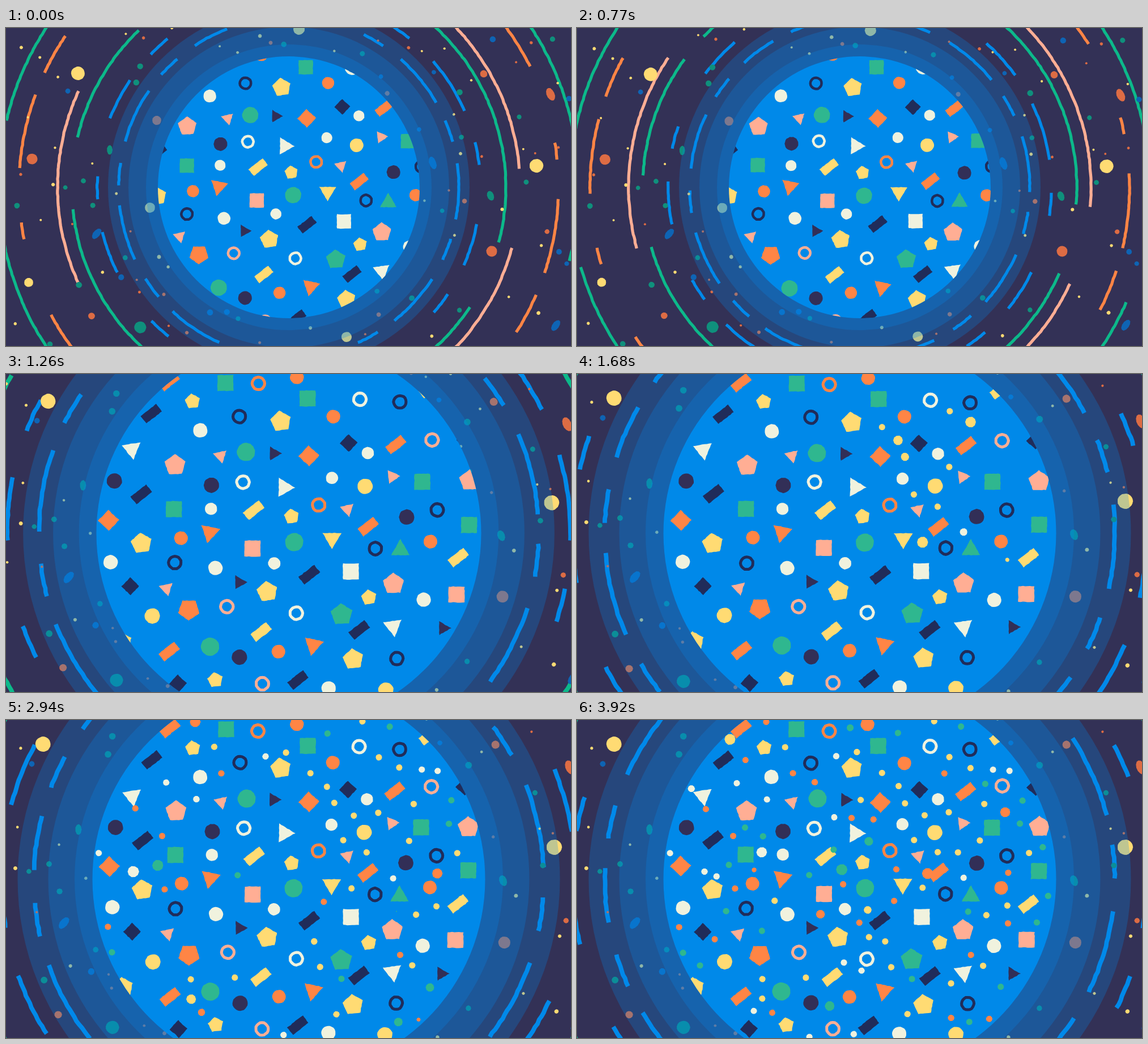
Animation of 997 by 561 pixels, one loop 3.99 s. Source, as an HTML page:

```html
<!DOCTYPE html>
<html lang="en">
<head>
<meta charset="utf-8">
<title>Shapes in a portal</title>
<style>
html, body { margin: 0; width: 100%; height: 100%; overflow: hidden; background: #333156; }
svg { display: block; width: 100%; height: 100%; }
</style>
</head>
<body>
<svg viewBox="0 0 997 561" preserveAspectRatio="none">
  <defs><clipPath id="hole"><circle id="holeEdge" cx="499" cy="281"/></clipPath></defs>
  <rect width="997" height="561" fill="#333156"/>
  <g id="arcs" fill="none" stroke-width="5.2"></g>
  <g id="dust"></g>
  <g id="rings" fill="#0089e9"></g>
  <g clip-path="url(#hole)"><g id="core"></g></g>
</svg>
<script>
const LOOP = 3990, STEP = 70, CUT = 1400, SKIP = 1550;
const CX = 499, CY = 281, ZOOM = 1.115;
const C = {
  blue: '#0089e9', green: '#2fb78f', mint: '#0cb98a', peach: '#ffae94', orange: '#ff8545',
  yellow: '#ffdb73', white: '#f0f2de', navy: '#322f57', ink: '#202c5a',
  rust: '#dd6c44', teal: '#0f907c', deep: '#0e64b4'
};

const $ = id => document.getElementById(id);
const rad = d => d * Math.PI / 180;
const clamp = v => Math.max(0, Math.min(1, v));
const lerp = (a, b, u) => a + (b - a) * u;
const polar = (r, deg) => [r * Math.cos(rad(deg)), r * Math.sin(rad(deg))];
const hash = (a, b) => { const v = Math.sin(a * 127.1 + b * 311.7) * 43758.5453; return v - Math.floor(v); };
const inOut = u => { u = clamp(u); return u < .5 ? 4 * u ** 3 : 1 - 4 * (1 - u) ** 3; };

let seed = 7;
const rnd = () => { seed = (seed * 16807) % 2147483647; return seed / 2147483647; };
const noise = a => (rnd() * 2 - 1) * a;

function add(parent, tag, attrs) {
  const el = document.createElementNS('http://www.w3.org/2000/svg', tag);
  for (const k in attrs) el.setAttribute(k, attrs[k]);
  $(parent).appendChild(el);
  return el;
}
const toPath = pts => 'M' + pts.map(p => p[0].toFixed(1) + ' ' + p[1].toFixed(1)).join('L');
const turn = (pts, deg) => {
  const [c, s] = polar(1, deg);
  return pts.map(([x, y]) => [x * c - y * s, x * s + y * c]);
};

// Hand-cut outlines, centred on 0,0
function cut(corners) {
  const out = [];
  corners.forEach(([x, y], i) => {
    const [u, v] = corners[(i + 1) % corners.length];
    const n = Math.max(1, Math.round(Math.hypot(u - x, v - y) / 4));
    for (let k = 0; k < n; k++) out.push([lerp(x, u, k / n) + noise(.5), lerp(y, v, k / n) + noise(.5)]);
  });
  return toPath(out) + 'Z';
}
const poly = (n, r, rot) => cut(Array.from({ length: n }, (_, i) => polar(r, rot + i * 360 / n)));
const box = (w, h, rot) => cut(turn([[-w, -h], [w, -h], [w, h], [-w, h]].map(p => [p[0] / 2, p[1] / 2]), rot));
function blob(rx, ry = rx, rot = 0) {
  const n = Math.max(8, Math.round(rx * 1.8));
  const pts = Array.from({ length: n }, (_, i) => {
    const [x, y] = polar(1 + noise(.03), i * 360 / n);
    return [x * rx, y * ry];
  });
  return toPath(turn(pts, rot)) + 'Z';
}

// Rotating dashes as [from, to] angles
const inner = [], middle = [], outer = [];
for (let i = 0; i < 9; i++) {
  const a = 255.4 + 40.75 * i;
  inner.push([a, a + 7.6], [a + 15, a + Math.min(34, 353.3 - 40.75 * i)]);
}
for (let i = 0; i < 8; i++) {
  const a = -36.4 + 47.5 * i;
  middle.push([a, a + 12.9], [a + 22.8, a + 29.7]);
}
for (const a of [2.5, 184.1]) outer.push([a, a + 16], [a + 21, a + 30], [a + 133, a + 149.3], [a + 166.4, a + 170]);
const sweep = [[33.5, 66.5], [74.3, 174.2], [193.3, 226.3], [234.1, 374.7]];
const side = [[15.2, 100], [155.2, 204.6], [290, 355.4]];

// radius, colour, degrees per second, dashes
const tracks = [
  [300, 'blue', -12.1, inner], [338, 'blue', 19.8, middle], [383, 'mint', -13.2, sweep],
  [408, 'peach', 12.3, side], [476, 'orange', -7.1, outer], [512, 'mint', -13.2, sweep]
].map(([r, color, speed, dashes]) => {
  const d = dashes.map(([a, b]) => {
    const n = Math.ceil((b - a) * r / 300);
    return toPath(Array.from({ length: n + 1 }, (_, i) => polar(r + noise(.45), lerp(a, b, i / n))));
  }).join('');
  return { el: add('arcs', 'path', { d, stroke: C[color] }), speed };
});

const halos = [319, 283, 252, 231].map(r =>
  ({ r, el: add('rings', 'circle', { cx: CX, cy: CY, opacity: r === 231 ? 1 : .25 }) }));

// Dust: the large specks are placed, the rest is scattered around the portal
const specks = [];
function speck(color, x, y, ...size) {
  specks.push([x, y]);
  add('dust', 'path', { d: blob(...size), fill: C[color], transform: `translate(${x} ${y})` });
}
speck('yellow', 127, 80, 12);
speck('yellow', 936, 243, 12);
speck('yellow', 40, 449, 8);
speck('yellow', 601, 545, 9);
speck('yellow', 517, 2, 10);
speck('yellow', 254, 317, 9);
speck('rust', 46, 231, 9.5);
speck('rust', 857, 394, 9.5);
speck('rust', 266, 163, 8);
speck('rust', 151, 508, 6);
speck('rust', 843, 81, 6.5);
speck('rust', 961, 117, 7, 12, -25);
speck('teal', 237, 528, 10.5);
speck('teal', 183, 215, 5, 8.5);
speck('teal', 855, 296, 6, 9, -20);
speck('deep', 160, 363, 6, 11, 40);
speck('deep', 753, 238, 6, 12, -20);
speck('deep', 970, 525, 6, 11, 35);

const nearest = (list, x, y) => Math.min(...list.map(p => Math.hypot(p[0] - x, p[1] - y)));
for (let i = 0; i < 90;) {
  const x = rnd() * 997, y = rnd() * 561;
  if (Math.hypot(x - CX, y - CY) < 236 || nearest(specks, x, y) < 22) continue;
  if (i < 32) speck(i % 3 ? 'teal' : 'deep', x, y, 4 + rnd() * 1.6);
  else speck(i % 5 < 3 ? 'yellow' : 'rust', x, y, 2 + rnd() * rnd() * 2.6);
  i++;
}

// Shapes in the circle, placed as seen after the zoom
const shapes = [];
function put(make, color, ...spots) {
  const look = make === hoop ? { fill: 'none', stroke: C[color], 'stroke-width': 5 } : { fill: C[color] };
  for (const [x, y] of spots) shapes.push({ x, y, el: add('core', 'path', { d: make(), ...look }) });
}
const hoop = () => blob(11), square = () => box(28, 28, 0), bar = () => box(35, 16.5, -38);
const diamond = s => () => box(s, s, 43), disc = r => () => blob(r);
const tri = (r, rot) => () => poly(3, r, rot), pent = (r, rot = -97) => () => poly(5, r, rot);

put(square, 'green', [388, 17], [532, 45], [298, 238], [733, 190], [815, 266]);
put(square, 'peach', [436, 307], [793, 388]);
put(square, 'white', [608, 348]);
put(diamond(26), 'orange', [183, 258], [535, 145]);
put(diamond(22), 'ink', [604, 123], [222, 374], [304, 545], [809, 118]);
put(bar, 'ink', [258, 71], [241, 212], [535, 354], [623, 451], [515, 538]);
put(bar, 'orange', [686, 126], [638, 269], [290, 488], [289, 15]);
put(bar, 'yellow', [438, 241], [450, 453], [797, 324], [746, 28]);
put(pent(19), 'yellow', [485, 85], [240, 299], [612, 502], [461, 383], [206, 473]);
put(pent(14), 'yellow', [330, 49], [504, 252], [640, 393], [370, 538]);
put(pent(19.5, -92), 'peach', [300, 161], [816, 189], [682, 370]);
put(pent(19.5, -53), 'orange', [323, 414]);
put(pent(20, -93), 'green', [591, 423]);
put(tri(19, 82), 'white', [223, 134], [682, 445]);
put(tri(19, 2), 'white', [491, 200]);
put(tri(19.5, 102), 'orange', [361, 279], [542, 477]);
put(tri(19, 90), 'yellow', [575, 290]);
put(tri(19, -90), 'green', [695, 310]);
put(tri(14, 0), 'navy', [473, 141], [412, 367], [769, 447]);
put(tri(14, 77), 'peach', [379, 145], [602, 239], [285, 377]);
put(tri(14, -5), 'peach', [680, 182]);
put(disc(13.4), 'navy', [193, 189], [364, 196], [413, 499], [705, 252]);
put(disc(12.6), 'white', [343, 101], [371, 342], [187, 331], [736, 398], [569, 553]);
put(disc(10.8), 'white', [473, 334], [363, 238], [574, 184], [637, 140]);
put(disc(16), 'green', [424, 139], [508, 297], [361, 479]);
put(disc(12), 'orange', [577, 76], [513, 7], [310, 289], [748, 296], [481, 488]);
put(disc(13.4), 'yellow', [632, 198], [260, 426], [669, 555]);
put(hoop, 'ink', [413, 76], [694, 51], [299, 333], [651, 307], [759, 240], [689, 500]);
put(hoop, 'orange', [445, 19], [552, 231]);
put(hoop, 'white', [419, 191], [623, 46], [512, 421]);
put(hoop, 'peach', [750, 117], [391, 410], [452, 545]);

// Small dots pop into the gaps, starting at the upper right and spreading out
const taken = shapes.map(s => [s.x, s.y]);
const later = ['orange', 'green', 'white', 'orange', 'green', 'yellow'];
const pops = Array.from({ length: 100 }, (_, i) => {
  const u = clamp(i / 28);
  let best = [0, 0], gap = -1;
  for (let k = 0; k < 10; k++) {
    const [dx, dy] = polar(lerp(130, 340, u) * Math.sqrt(rnd()), rnd() * 360);
    const x = lerp(650, CX, u) + dx, y = lerp(165, CY, u) + dy;
    const d = y > 0 && y < 561 ? nearest(taken, x, y) : 0;
    if (d > gap) { gap = d; best = [x, y]; }
  }
  taken.push(best);
  const color = i < 24 ? (i % 6 === 5 ? 'white' : 'yellow') : later[i % 6];
  return {
    x: best[0], y: best[1], at: 1100 + 2800 * (i / 100) ** .71,
    el: add('core', 'path', { d: blob(5.7), fill: C[color] })
  };
});
function popSize(ms) {
  const q = ms / 400;
  if (q <= 0) return 0;
  if (q < .35) return 1.75 * Math.sin(q / .35 * Math.PI / 2);
  return 1 + .375 * (1 + Math.cos(Math.PI * clamp((q - .35) / .4)));
}

function draw(t) {
  const after = t >= CUT;
  const spin = (t + (after ? SKIP : 0)) / 1000;

  const z = after ? 1.5 : 1 + .5 * inOut((t - 800) / 611);
  halos.forEach(h => h.el.setAttribute('r', h.r * z));
  $('holeEdge').setAttribute('r', 231 * z);
  $('arcs').setAttribute('transform', `translate(${CX} ${CY}) scale(${z})`);
  tracks.forEach(a => a.el.setAttribute('transform', `rotate(${a.speed * spin})`));

  // The dust shrinks a little before it grows, the shapes overshoot
  const back = 1 - .0055 * Math.min(t, 770) / 770;
  const d = after ? ZOOM : lerp(back, ZOOM, inOut((t - 800) / 683));
  $('dust').setAttribute('transform', `translate(663 405) scale(${d}) translate(-663 -405)`);

  const p = after ? 1 : inOut((t - 800) / 520) + .07 * Math.sin(Math.PI * clamp((t - 1100) / 300));
  const k = lerp(1, ZOOM, p) / ZOOM;
  $('core').setAttribute('transform', `translate(${CX} ${CY}) scale(${k}) translate(${-CX} ${-CY})`);

  const beat = Math.floor(t / 140);
  const place = (s, i, size) => {
    const x = s.x + (hash(i, beat) - .5) * 1.6, y = s.y + (hash(i + 200, beat) - .5) * 1.6;
    s.el.setAttribute('transform', `translate(${x.toFixed(2)} ${y.toFixed(2)}) scale(${size.toFixed(3)})`);
  };
  shapes.forEach((s, i) => place(s, i + 1, 1));
  pops.forEach((s, i) => place(s, i + 101, after ? popSize(t - s.at) : 0));
}

const begin = performance.now();
let last = -1;
function tick() {
  const now = Math.max(0, performance.now() - begin) % LOOP;
  const t = Math.floor(now / STEP) * STEP;
  if (t !== last) draw(last = t);
  requestAnimationFrame(tick);
}
tick();
</script>
</body>
</html>
```
